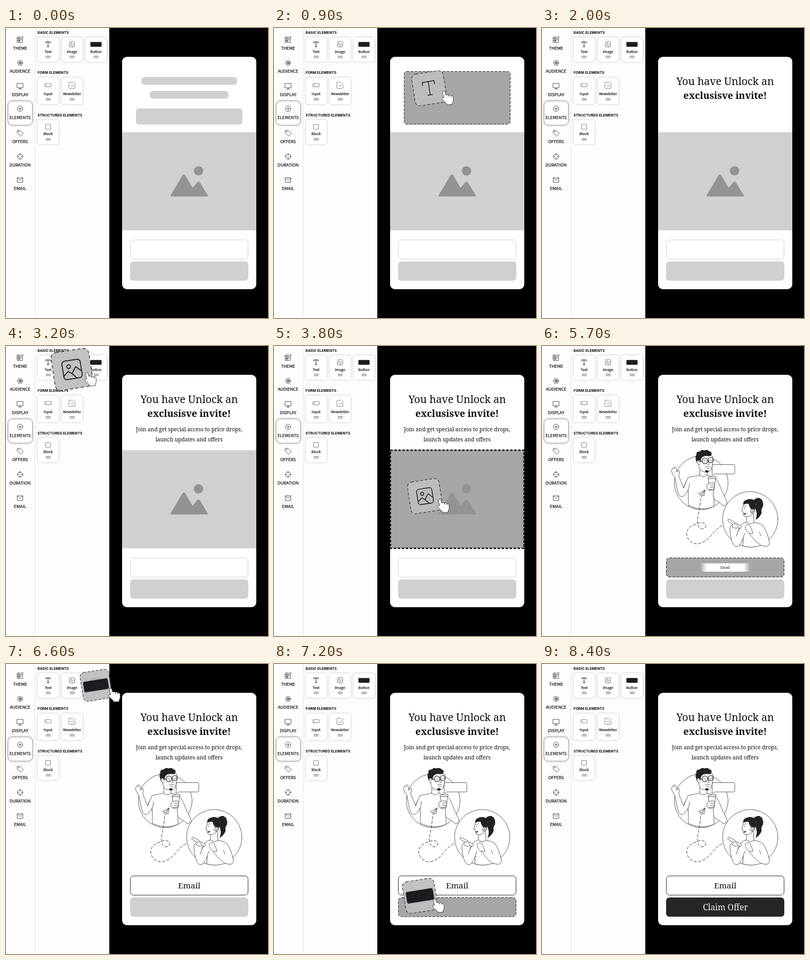
Write an HTML page that moves like this. It is 492 px wide and 544 px high and loops after 8600 ms.

```html
<!DOCTYPE html>
<html lang="en">
<head>
<meta charset="utf-8">
<title>Popup builder</title>
<style>
html, body { margin: 0; width: 100%; height: 100%; overflow: hidden; background: #000; }
svg { display: block; width: 492px; height: 544px; }
text { text-anchor: middle; fill: #0c0c0c; }
.nav, .label { font-family: "Noto Sans CJK SC", "Noto Sans CJK JP", "Noto Sans", sans-serif; stroke: #0c0c0c; stroke-width: .2; }
.nav { font-size: 8px; font-weight: 500; }
.label { font-size: 6.7px; font-weight: 500; }
.title { font: 700 6.75px Inter, "Open Sans", sans-serif; text-anchor: start; }
.serif { font-family: "Noto Serif", "Liberation Serif", serif; }
.line { fill: none; stroke: #3c3c3c; stroke-width: .8; stroke-linecap: round; stroke-linejoin: round; }
.art { fill: #fff; stroke: #3c3c3c; stroke-width: .8; stroke-linecap: round; stroke-linejoin: round; }
.ink { fill: #222; stroke: none; }
.card { fill: #fff; stroke: #e2e2ea; filter: drop-shadow(0 0 1px #d4d4de); }
.gray { fill: #cfd0d2; }
.zone rect { fill: #a6a6a6; stroke: #222; stroke-dasharray: 4.5 3; }
</style>
</head>
<body>
<svg viewBox="0 0 492 544">
<defs>
  <linearGradient id="plate">
    <stop offset="0" stop-color="#fff" stop-opacity="0"/>
    <stop offset=".13" stop-color="#fff"/>
    <stop offset=".87" stop-color="#fff"/>
    <stop offset="1" stop-color="#fff" stop-opacity="0"/>
  </linearGradient>
  <g id="i-text"><path d="M-4-2.2V-4.5H4V-2.2M0-4.5V4.5M-1.8 4.5H1.8"/></g>
  <g id="i-image">
    <rect x="-5" y="-5" width="10" height="10" rx="1.6"/>
    <circle cx="-1.6" cy="-1.8" r="1"/>
    <path d="M-5 3L-2.2 .8L-.4 2.2L2.2-1.2L5 1.6M-.4 2.2L2 5"/>
  </g>
  <g id="i-button"><rect x="-10.5" y="-4.5" width="21" height="9" rx="1.4" fill="#1e1c20" stroke="none"/></g>
  <g id="i-input"><rect x="-6" y="-3" width="12" height="6" rx=".8"/><path d="M-4-1.5V1.5"/></g>
  <g id="i-news"><path d="M5.5-.5V4.5Q5.5 6 4 6H-4.5Q-6 6-6 4.5V-4Q-6-5.5-4.5-5.5H2.5M-3-.5L0 2.5L6.5-5"/></g>
  <g id="i-block"><rect x="-4.5" y="-4.5" width="9" height="9" rx=".6"/></g>
  <g id="dots"><path d="M-3.8 0H4.5M-3.8 2.7H4.5" fill="none" stroke="#222" stroke-width="1.3" stroke-dasharray="1.3 1.1"/></g>
</defs>

<rect width="194" height="544" fill="#fefdfe"/>
<path d="M54.5 0V544" stroke="#e4e4e8"/>
<rect x="4" y="137" width="45.5" height="45" rx="8" fill="#fff" stroke="#b4b4b4" style="filter:drop-shadow(0 0 1.5px #888)"/>
<g id="nav"></g>
<g class="line" style="stroke:#222;stroke-width:.75">
  <path d="M31 20V27H21V17H28M21 20H27M21 23.5H25M24 17V27M25 24.5L26 21.5L31 15.5L32.6 17L27.8 23Z"/>
  <circle cx="26.5" cy="65.5" r="4.8"/><circle cx="26.5" cy="65.5" r="2.7"/><circle cx="26.5" cy="65.5" r="1" fill="#222"/>
  <path d="M21 104H32V112H21ZM26.5 112V114.5M23.5 114.5H29.5"/>
  <circle cx="26.5" cy="151.5" r="5"/><path d="M24 151.5H29M26.5 149V154"/>
  <path d="M21.5 192H26.5L32 197.5Q32.5 198 32 198.5L28 202.5Q27.4 203 27 202.5L21.5 197Z"/><circle cx="24" cy="194.5" r=".6"/>
  <circle cx="26.5" cy="241" r="5"/><path d="M26.5 236V239M26.5 243V246M21.5 241H24.5M28.5 241H31.5"/>
  <path d="M21.5 281H31.5V289.5H21.5ZM21.5 281L26.5 286L31.5 281"/>
</g>
<text class="title" x="59.2" y="11">BASIC ELEMENTS</text>
<text class="title" x="59.2" y="86.3">FORM ELEMENTS</text>
<text class="title" x="59.2" y="165.5">STRUCTURED ELEMENTS</text>
<g id="tiles"></g>

<rect x="218" y="54" width="252" height="436" rx="9" fill="#fff"/>
<g class="gray">
  <g id="bars">
    <rect x="254" y="92" width="180" height="14.5" rx="6"/>
    <rect x="270" y="118" width="148" height="14.5" rx="6"/>
    <rect x="244" y="151" width="200" height="30" rx="5"/>
  </g>
  <rect x="218" y="195.5" width="252" height="184"/>
  <rect x="233" y="438" width="222" height="36" rx="6" id="slot"/>
</g>
<rect x="233.5" y="397.5" width="221" height="36" rx="6" fill="#fff" stroke="#d3d3d6"/>

<g class="zone">
  <rect id="z-head" x="244.5" y="81.5" width="199" height="99" rx="5"/>
  <rect id="z-sub" x="244.5" y="151.5" width="199" height="29" rx="5"/>
  <rect id="z-art" x="218.5" y="195.5" width="251" height="184" style="stroke:#000;stroke-width:2.6"/>
  <rect id="z-mail" x="233.5" y="397.5" width="221" height="36" rx="6"/>
  <rect id="z-btn" x="233.5" y="438" width="221" height="36" rx="6"/>
</g>

<g id="hill" fill="#929395" stroke="#929395" stroke-width="3" stroke-linejoin="round">
  <circle cx="361.5" cy="268" r="7.3"/>
  <path d="M310.5 314.5L332.5 277.5Q334 275.5 335.5 277.5L348.5 299.5Q350.5 302 352.5 299.5L360 290.5Q361.5 289 363 290.5L377.5 314.5Z"/>
</g>

<g id="art">
  <rect x="218" y="194" width="252" height="187" fill="#fff"/>
  <circle class="art" cx="299" cy="256.5" r="50.5"/>
  <!-- man -->
  <path class="art" d="M274 247Q270 256 266 266Q260 252 256.5 243Q260 236 256.5 233Q254.5 234 253 237Q253 229 250 226.5Q248 226 248.5 230Q245 227 244.5 231Q242 233 244 237Q246 243 249.5 246Q252 262 256 277Q259 284 265 282Q271 278 274.5 270L275 299Q299 311 323 301L323 287Q333 293 341 300Q349 298 347 291Q339 276 333 260Q329 248 318 245L310 242L309.5 231H296.5L296 242Z"/>
  <path class="line" d="M274.5 270Q277 263 277 258M323 287Q321 279 322 270M296 242Q303 249 310 242M266 266Q268 260 270 257"/>
  <path class="art" d="M293 209Q293 231 300 235Q308 238 314 236Q321 232 321 207Q308 202 293 209Z"/>
  <path class="ink" d="M291 219Q286 209 290 204Q289 197 296 198Q300 193 305 196Q311 193 315 198Q320 199 318 205Q314 208 308 206Q301 207 299 211Q298 217 295 222Z"/>
  <path class="art" d="M296 215Q291 213 291 218Q292 223 296 222"/>
  <path class="ink" d="M306 234Q309.5 232 313 234Q312 237.5 309.5 237.5Q307 237 306 234Z"/>
  <g class="line" style="stroke-width:1.3"><circle cx="306" cy="215.5" r="5.3"/><circle cx="317" cy="214" r="4.8"/><path d="M297 216H300.700"/></g>
  <path class="line" d="M312 216L314 222L311 223M307 227Q311 224.5 315 226.5M309 230Q311.5 231 314 229.5M304 215.500H307M316 214.500H319"/>
  <path class="art" d="M322 222.5H360Q362 222.5 362 224.5V238Q362 240 360 240H325L319 243L319.5 238V225Q319.5 222.500 322 222.500Z"/>
  <path class="art" d="M313 248L326 246L323.5 270L314 270.500Z"/>
  <path class="art" d="M312 246L327 244.500L326.5 248L312.5 249ZM310 260Q314 256 322 257Q326 258 324 261Q326 263 323 265Q324 268 320 269Q313 271 310 268Z"/>
  <path class="line" d="M316 261H323M316 265H322"/>
  <!-- plane and trail -->
  <path class="art" d="M306 270L294 277L298 279L299 283L301 280L304 281Z"/><path class="line" d="M298 279L306 270L301 280"/>
  <path class="line" d="M298 286Q296 306 291.5 326Q291 342 301 343Q309 342 307 335Q302 328 289 334Q273 339 271.5 351Q273 368 289 371Q305 371 318 355Q333 335 351 333" style="stroke-width:1;stroke-dasharray:5 3.5"/>
  <!-- woman -->
  <circle class="art" cx="391" cy="325" r="52"/>
  <path class="art" d="M384 316L384 330Q375 333 371 339L368 347Q372 343 371 338Q366 332 358 335Q352 338 353 345Q353 361 360 373Q364 379 370 375Q375 369 378 360L377 375Q394 380 411 374L421 376Q428 374 427 368Q423 348 415 337Q409 332 398 331L397 314Z"/>
  <path class="line" d="M411 374Q396 363 389 351M378 360Q379 355 381 351M384 330Q390 336 398 331M411 356Q410 352 408 349M368 347L365 357"/>
  <path class="art" d="M388 351Q381 345 382 338Q386 333 390 336Q394 343 396 351Z"/>
  <path class="ink" d="M395 295Q398 284 408 285Q417 289 415 301Q411 306 412.5 313Q409 322 401 326Q405 316 402 309Q399 302 402 296Z"/>
  <path class="art" d="M380 295Q376 300 377 304L375 310L377.5 311Q377 319 382 320Q390 321 396 314L398 297Z"/>
  <path class="ink" d="M378 298Q377 291 383 289Q391 285 398 289Q403 295 401 304Q400 308 397 310L393 306Q389 302 388 296Q383 295 378 298Z"/>
  <circle class="art" cx="395" cy="310" r="4"/><circle class="line" cx="395" cy="310.5" r="1.8"/>
  <path class="line" d="M379 301Q381 299 384 300M380.500 303.500V305.500"/>
  <path class="ink" d="M379 314L384 313.500Q382 317 379 316Z"/>
  <path class="art" d="M349 326Q350 324 352 325L374 338Q376 340 374 341.5L371 342L350 329Z"/>
  <path class="art" d="M358 340Q355 336 359 334Q363 332 367 337Q369 340 365 342Z"/>
</g>

<g id="head">
  <rect x="244" y="81" width="200" height="100" fill="url(#plate)"/>
  <text class="serif" x="344" y="106.5" font-size="19.5">You have Unlock an</text>
  <text class="serif" x="344" y="133" font-size="17.7" font-weight="700">exclusisve invite!</text>
</g>
<g id="sub">
  <rect x="244" y="151" width="200" height="30" fill="url(#plate)"/>
  <text class="serif" x="343.8" y="159.5" font-size="10.2">Join and get special access to price drops,</text>
  <text class="serif" x="343.8" y="178.5" font-size="10.2">launch updates and offers</text>
</g>
<g id="mail">
  <rect x="233" y="397" width="222" height="37" fill="url(#plate)"/>
  <rect id="rim" x="233.5" y="397.5" width="221" height="36" rx="6" fill="#fff" stroke="#333"/>
  <text class="serif" x="344" y="421" font-size="15.3">Email</text>
</g>
<g id="btn">
  <rect x="233" y="438" width="222" height="36" rx="6" fill="#262626"/>
  <text class="serif" x="344.3" y="461.5" font-size="15.4" style="fill:#f4f4f4">Claim Offer</text>
</g>

<g id="drag">
  <g id="lift">
    <rect x="-30" y="-30" width="60" height="60" rx="9" fill="#bebebe" fill-opacity=".93" stroke="#222" stroke-dasharray="5 3.5"/>
    <use id="icon" fill="none" stroke="#1c1c1c" stroke-width=".5" stroke-linejoin="round"/>
  </g>
  <path transform="translate(23 5)" fill="#fff" stroke="#444" stroke-linejoin="round" d="M4.5 13L2 3.5Q1.7 .5 4.2 .3Q6.3 .3 7 3L8.6 8Q11.5 6 13.5 8Q16.5 6.7 18 9Q21 8.3 22 11L22.5 16.5Q22.5 20 20.5 22.5L20.5 25.5L10 26L9.3 23.5Q4.5 20 1.2 15.5Q.2 13 2 12.5Q3.4 12.3 4.5 13ZM13.5 8L14 11M18 9L18.3 12"/>
</g>
</svg>
<script>
const $ = id => document.getElementById(id);
const clamp = v => Math.max(0, Math.min(1, v));
const mix = (a, b, p) => a + (b - a) * p;
const smooth = p => p * p * (3 - 2 * p);
const back = p => 1 + 2.2 * (p - 1) ** 3 + 1.2 * (p - 1) ** 2;
const fade = (id, v) => $(id).setAttribute('opacity', clamp(v));

$('nav').innerHTML = [['THEME', 41], ['AUDIENCE', 84], ['DISPLAY', 128], ['ELEMENTS', 170.5],
  ['OFFERS', 215.5], ['DURATION', 259.5], ['EMAIL', 303.5]]
  .map(([s, y]) => `<text class="nav" x="26.5" y="${y}">${s}</text>`).join('');

// name, icon, centre x, top, height
$('tiles').innerHTML = [['Text', 'text', 79, 17, 47], ['Image', 'image', 124, 17, 47], ['Button', 'button', 169, 17, 47],
  ['Input', 'input', 79, 92.5, 51], ['Newsletter', 'news', 124, 92.5, 51], ['Block', 'block', 79, 172, 46.5]]
  .map(([s, i, x, y, h]) => `<rect class="card" x="${x - 20}" y="${y}" width="40.5" height="${h}" rx="4.5"/>
    <use href="#i-${i}" x="${x}" y="${y + h * .29}" fill="none" stroke="#333" stroke-width="${i == 'text' ? 1.1 : .6}"/>
    <text class="label" x="${x}" y="${y + h - 17.5}">${s}</text>
    <use href="#dots" x="${x}" y="${y + h - 11}"/>`).join('');

const steps = [
  { id: 'head', icon: 'text', size: 2.8, from: [79, 40], to: [344, 131], pick: 300, wait: 100, show: 300, grow: 1150, len: 850 },
  { id: 'sub', icon: 'text', size: 2.8, from: [79, 40], to: [344, 166], pick: 1950, wait: 100, show: 2300, grow: 2750, len: 350 },
  { id: 'art', icon: 'image', size: 2.9, from: [124, 44], to: [344, 287], pick: 3200, wait: 70, show: 3200, curve: true },
  { id: 'mail', icon: 'input', size: 3, from: [79, 118], to: [344, 415.5], pick: 4800, wait: 100, show: 4800, grow: 5600, len: 850, curve: true },
  { id: 'btn', icon: 'button', size: 2.45, from: [169, 40], to: [344, 456], pick: 6500, wait: 215, show: 6500, grow: 7450, len: 850, curve: true, pop: .85 }
];

function drag(s, t) {
  const start = s.pick + s.wait, u = smooth(clamp((t - start) / 700));
  const x = mix(s.from[0], s.to[0], s.curve ? u * u : u);
  const y = mix(s.from[1], s.to[1], s.curve ? 1 - (1 - u) ** 2 : u);
  const out = clamp((t - start - 600) / 150);
  const k = mix(s.pop || 1.2, 1, clamp((t - s.pick) / 250)) * (1 - out * .4);
  $('drag').setAttribute('transform', `translate(${x} ${y})`);
  $('lift').setAttribute('transform', `rotate(-9) scale(${k})`);
  $('icon').setAttribute('href', '#i-' + s.icon);
  $('icon').setAttribute('transform', `scale(${s.size})`);
  fade('drag', 1 - out);
}

function draw(t) {
  fade('drag', 0);
  for (const s of steps) {
    const land = s.pick + s.wait + 750;
    if (t >= s.show && t < land) drag(s, t);
    const glow = t < s.show ? 0 : clamp((t - s.pick - s.wait - 250) / 200);
    if (!s.grow) {
      const p = clamp((t - 4000) / 465);
      fade('z-art', glow * (1 - p));
      fade('art', p);
      continue;
    }
    const p = clamp((t - s.grow) / s.len), k = Math.max(.05, back(p));
    fade('z-' + s.id, p < .45 ? glow : 0);
    fade(s.id, p > 0 ? 1 : 0);
    const [x, y] = s.to;
    $(s.id).setAttribute('transform', `translate(${x} ${y}) scale(${k}) translate(${-x} ${-y})`);
    if (s.id == 'mail') fade('rim', p < .45 ? 0 : 1);
    if (s.id == 'btn') fade('slot', p < .45 ? 1 : 0);
  }
  fade('bars', t < 1000 ? 1 : 0);
  fade('hill', t < 4500 ? 1 - clamp((t - 3900) / 200) * .3 : 0);
}

// the motion advances in tenths of a second
function tick() {
  draw(Math.floor(performance.now() % 8600 / 100) * 100);
  requestAnimationFrame(tick);
}
tick();
</script>
</body>
</html>
```
